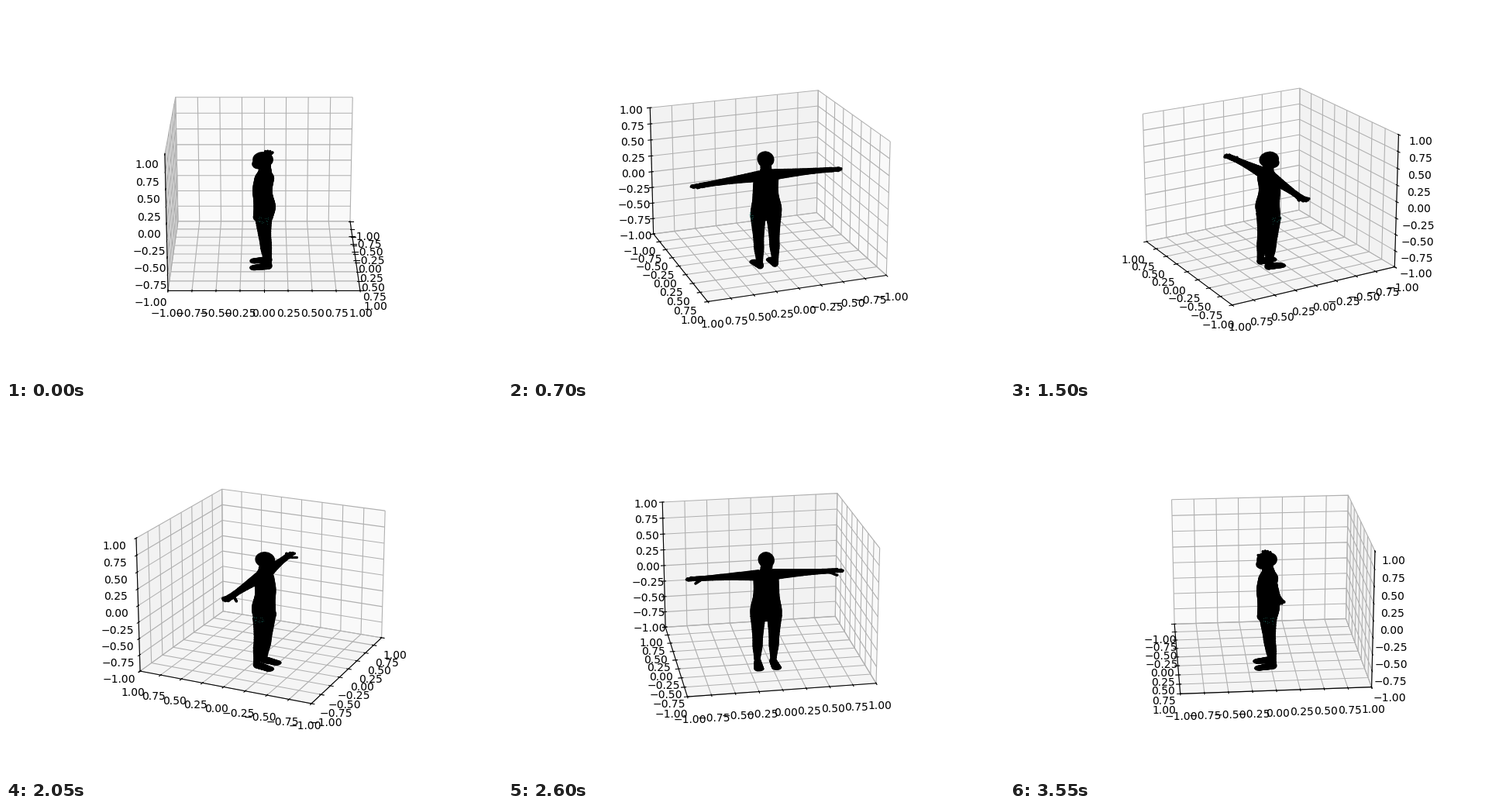
Write an HTML page with a canvas that moves like this. It is 640 by 480 pixels and loops after 3.6 s.

```html
<!DOCTYPE html>
<html lang="en">
<head>
<meta charset="utf-8">
<title>Rotating figure</title>
<style>
  html, body { margin: 0; width: 100%; height: 100%; overflow: hidden; background: #fff; }
  canvas { display: block; }
</style>
</head>
<body>
<canvas id="stage" width="640" height="480"></canvas>
<script>
const ctx = document.getElementById('stage').getContext('2d');
const STEPS = 72, STEP_MS = 50;
const HALF = [0.59524, 0.59524, 0.44643];   // half size of the box
const SCALE = 1997.84, DIST = 10, CX = 332.99, CY = 237.41;
const ELEV = 20 * Math.PI / 180, SE = Math.sin(ELEV), CE = Math.cos(ELEV);
const LABEL_PAD = 0.166;
const PANES = ['#f9f9f9', '#f2f2f2', '#f5f5f5'];

let ca = 1, sa = 0;

function project([x, y, z]) {
  x *= HALF[0]; y *= HALF[1]; z *= HALF[2];
  const fwd = x * ca + y * sa;
  const k = SCALE / (DIST - fwd * CE - z * SE);
  return [CX + (y * ca - x * sa) * k, CY - (z * CE - fwd * SE) * k];
}

const set = (p, i, v) => p.map((c, j) => j === i ? v : c);
const clamp = v => Math.max(0, Math.min(1, v));
const ease = v => (v = clamp(v)) * v * (3 - 2 * v);
const bump = (v, at, width) => Math.exp(-(((v - at) / width) ** 2));
const mix = (a, b, u) => a.map((v, i) => v + (b[i] - v) * u);

function eachTick(fn) {
  for (let t = -1; t <= 1; t += 0.25) fn(t);
}

function line(points, color, cap) {
  let pts = points.map(project);
  // Level and upright lines sit on whole pixels.
  const flat = i => pts.every(p => Math.abs(p[i] - pts[0][i]) < 1e-6);
  if (flat(0) || flat(1)) pts = pts.map(p => p.map(v => Math.round(v) + 0.5));
  ctx.beginPath();
  pts.forEach(([x, y]) => ctx.lineTo(x, y));
  ctx.strokeStyle = color;
  ctx.lineCap = cap;
  ctx.lineWidth = 1.11;
  ctx.stroke();
}

function drawPane(i, far) {
  const a = (i + 1) % 3, b = (i + 2) % 3;
  const corner = (u, v) => project(set(set(far, a, u), b, v));
  ctx.beginPath();
  for (const [x, y] of [corner(-1, -1), corner(1, -1), corner(1, 1), corner(-1, 1)]) ctx.lineTo(x, y);
  ctx.fillStyle = PANES[i];
  ctx.fill();
}

function drawGrid(i, far) {
  const a = (i + 1) % 3, b = (i + 2) % 3;
  eachTick(t => {
    const p = set(far, i, t);
    line([set(p, a, -p[a]), p, set(p, b, -p[b])], '#b0b0b0', 'butt');
  });
}

// Centred label with its top at y; the first glyph sits one pixel to the right.
function drawLabel(text, x, y) {
  const bearing = text[0] === '0' ? 0.92 : 1.5;
  const left = Math.round(x - ctx.measureText(text).width / 2 + bearing) - Math.ceil(bearing);
  const base = Math.round(y + 11);
  ctx.fillText(text[0], left + 1, base);
  ctx.fillText(text.slice(1), left + ctx.measureText(text[0]).width, base);
}

function drawAxis(i, far) {
  const side = i === 0 ? 1 : 0;
  const edge = set(far, side, -far[side]), out = far[side];
  line([set(edge, i, -1), set(edge, i, 1)], '#000', 'square');
  eachTick(t => {
    const p = set(edge, i, t);
    line([0.016, -0.032].map(d => set(p, side, p[side] + d * out)), '#000', 'square');
    const spot = project(p.map((c, j) => j === i ? c : c + Math.sign(c) * LABEL_PAD));
    drawLabel(t.toFixed(2).replace('-', '\u2212'), ...spot);
  });
}

// Ellipsoid: centre, then the radius along each axis.
function blob([x, y, z, ...radii]) {
  const c = [x, y, z], [px, py] = project(c);
  let xx = 0, xy = 0, yy = 0;
  radii.forEach((r, i) => {
    const q = project(set(c, i, c[i] + r)), dx = q[0] - px, dy = q[1] - py;
    xx += dx * dx; xy += dx * dy; yy += dy * dy;
  });
  const w = Math.sqrt(xx), skew = xy / w, h = Math.sqrt(Math.max(yy - skew * skew, 0.01));
  ctx.save();
  ctx.transform(w, skew, 0, h, px, py);
  ctx.beginPath();
  ctx.arc(0, 0, 1, 0, 2 * Math.PI);
  ctx.fill();
  ctx.restore();
}

// Run of blobs along a limb, u from 0 to 1.
function tube(count, shape, mirror = 1) {
  for (let i = 0; i <= count; i++) {
    const [x, ...rest] = shape(i / count);
    blob([x * mirror, ...rest]);
  }
}

function torso(u) {
  const z = 0.36 - 0.78 * u;
  const rx = 0.062 + 0.078 * ease((0.32 - z) / 0.12) + 0.037 * bump(z, -0.34, 0.19);
  const ry = 0.062 + 0.046 * ease((0.32 - z) / 0.15) + 0.012 * bump(z, -0.26, 0.12);
  return [0, 0.012 * Math.cos((z + 0.26) * 4 * Math.PI) - 0.006, z, rx, ry, 0.03];
}

function leg(u) {
  const r = 0.086 - 0.05 * u ** 0.8 + 0.007 * bump(u, 0.7, 0.15);
  return [0.091, 0.05 * u ** 1.5 - 0.005, -0.4 - 0.7 * u, r, r * 1.12, 0.03];
}

function foot(u) {
  return [0.086 + 0.012 * u, 0.045 - 0.16 * u, -1.14 - 0.025 * u, 0.04 + 0.016 * u, 0.047, 0.055 - 0.025 * u];
}

function arm(u) {
  const r = 0.035 + 0.045 * (1 - u) ** 1.5;
  return [0.08 + 0.67 * u, 0.01 + 0.033 * u, 0.228 - 0.016 * u * u, 0.03, r * 0.92 + 0.015 * bump(u, 1, 0.1), r];
}

function finger(from, to, mirror) {
  tube(8, u => [...mix(from, to, u), 0.015, 0.015, 0.02], mirror);
}

function drawSpecks() {
  if (Math.abs(ca) < 0.3) return;
  const rnd = n => { const v = Math.sin(n * 91.7) * 4375.3; return v - Math.floor(v) - 0.5; };
  ctx.fillStyle = 'rgba(30, 140, 125, 0.4)';
  for (let n = 1; n <= 18; n++) {
    const [x, y] = project([Math.sign(ca) * 0.17, rnd(n) * 0.12 - 0.01, -0.39 + rnd(n + 40) * 0.12]);
    ctx.fillRect(Math.round(x), Math.round(y), 1, 1);
  }
}

function drawBody() {
  ctx.fillStyle = '#000';
  blob([0, -0.012, 0.465, 0.089, 0.112, 0.113]);
  blob([0, -0.065, 0.4, 0.06, 0.068, 0.075]);
  tube(64, torso);
  for (const side of [-1, 1]) {
    tube(40, leg, side);
    tube(16, foot, side);
    tube(40, arm, side);
    finger([0.69, 0.03, 0.21], [0.775, -0.045, 0.185], side);
    for (let i = 0; i < 4; i++) {
      finger([0.75, 0.02 + 0.018 * i, 0.212], [0.86 - 0.013 * (i - 1) ** 2, 0.015 + 0.027 * i, 0.21], side);
    }
  }
  drawSpecks();
}

function draw(step) {
  const az = step * 2 * Math.PI / STEPS;
  ca = Math.cos(az);
  sa = Math.sin(az);
  const far = [ca < -1e-9 ? 1 : -1, sa < -1e-9 ? 1 : -1, -1];
  ctx.fillStyle = '#fff';
  ctx.fillRect(0, 0, 640, 480);
  for (let i = 0; i < 3; i++) drawPane(i, far);
  for (let i = 0; i < 3; i++) drawGrid(i, far);
  ctx.fillStyle = '#000';
  ctx.font = '13.889px "DejaVu Sans", sans-serif';
  for (let i = 0; i < 3; i++) drawAxis(i, far);
  drawBody();
}

let shown = 0;
const start = performance.now();
function tick() {
  const step = Math.floor(Math.max(0, performance.now() - start) / STEP_MS) % STEPS;
  if (step !== shown) draw(shown = step);
  requestAnimationFrame(tick);
}
draw(0);
requestAnimationFrame(tick);
</script>
</body>
</html>
```
